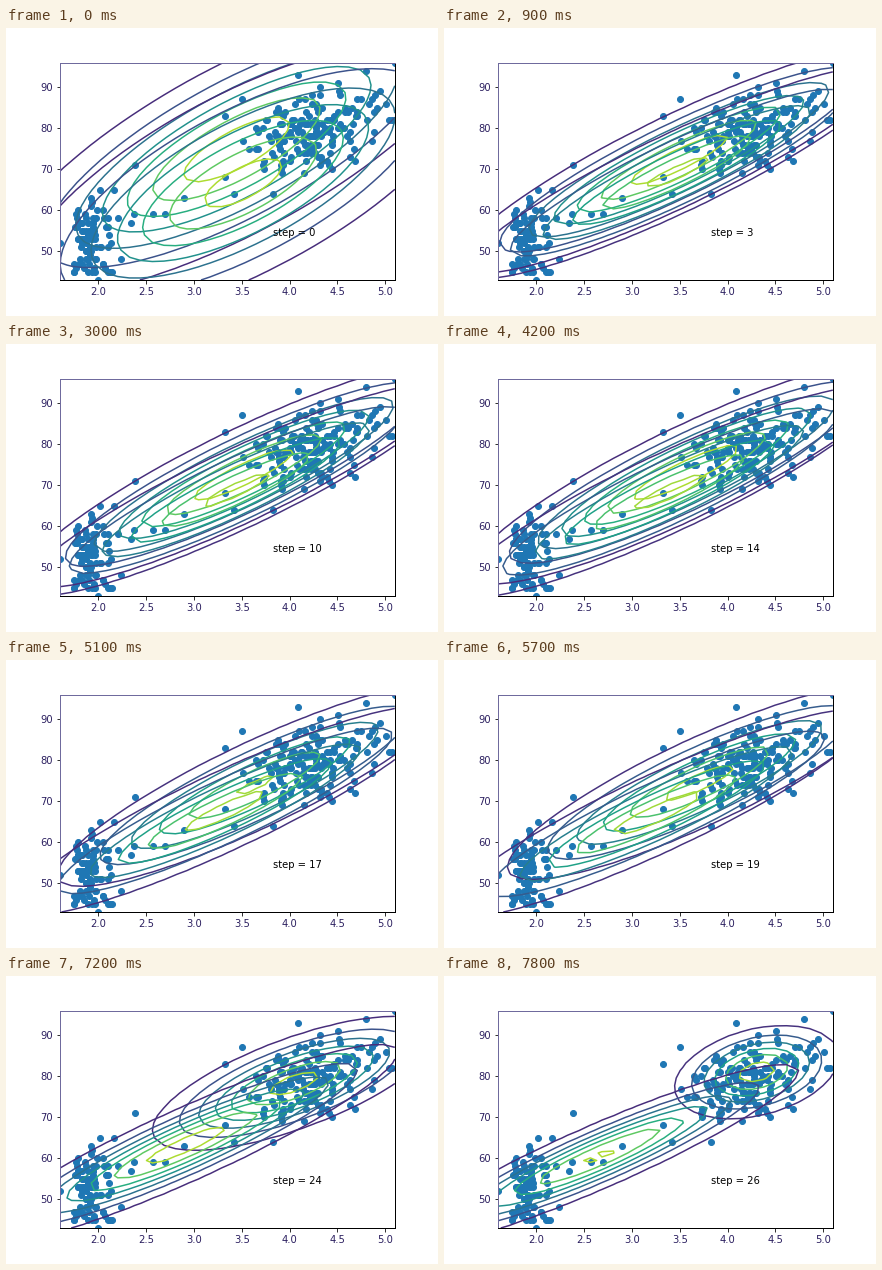
These frames come from a looping animation (432 by 288 pixels, 8 s). A matplotlib script:

```python
import numpy as np
import matplotlib.pyplot as plt
from matplotlib.animation import FuncAnimation

XLIM, YLIM = (1.6, 5.1), (43, 96)
CENTER_X, CENTER_Y = 3.48, 70.75
LAST_STEP = 26
INDIGO = "#2c2060"

# A few lone observations outside the two dense groups
LONERS = [(1.6, 52), (5.1, 96), (3.83, 64), (3.32, 83), (3.5, 87), (2.38, 71),
          (2.9, 63), (3.33, 68), (3.42, 64), (4.8, 94), (4.09, 93), (2, 43)]


def make_data():
    rng = np.random.default_rng(7)
    short_x = 1.73 + rng.gamma(1.7, 0.16, 92)
    short_y = 54 + 8 * (short_x - 2) + 5.3 * rng.normal(size=92)
    z = rng.normal(size=(300, 2))
    z = z[np.hypot(*z.T) < 2.1][:168]
    long_x = 4.3 + 0.38 * z[:, 0]
    long_y = 79.8 + 5.6 * (0.3 * z[:, 0] + 0.95 * z[:, 1])
    x = np.concatenate([short_x, long_x]).clip(1.67, 5.07)
    y = np.concatenate([short_y, long_y]).clip(45, 92)
    return np.vstack([np.column_stack([x, y.round()]), LONERS])


def components(step):
    """Mean, sd of x, slope and residual sd of both Gaussians.

    They start broad, collapse onto the overall trend at once, then drift
    apart exponentially along it.
    """
    start = 0.05 ** step
    split = np.exp(0.186 * (step - LAST_STEP))
    half_x = 0.825 * split - 0.04 * start
    half_y = 1.45 + 8.8 * split + 2.6 * start
    upper = (CENTER_X + half_x, CENTER_Y + half_y,
             1.14 - 0.7 * split ** 1.5 + 0.08 * start,
             10.8 - 6.45 * split ** 2 + 0.25 * start,
             6 - 0.5 * split ** 2 + 5.2 * start)
    lower = (CENTER_X - half_x, CENTER_Y - half_y,
             1.15 - 0.1 * split ** 2 + 0.03 * start,
             10.7 - 0.75 * split - 0.33 * start,
             5.5 - 1.3 * split ** 1.5 + 6.6 * start)
    return upper, lower


def density(mx, my, sx, slope, res):
    u = (X - mx) / sx
    v = (Y - my - slope * (X - mx)) / res
    return np.exp(-(u * u + v * v) / 2) / (2 * np.pi * sx * res)


X, Y = np.meshgrid(np.linspace(*XLIM, 30), np.linspace(*YLIM, 30))

fig = plt.figure(figsize=(6, 4), dpi=72, facecolor="white")
ax = fig.add_axes([0.125, 0.125, 0.775, 0.755])
ax.scatter(*make_data().T, color="#1f77b4")
ax.tick_params(labelcolor=INDIGO)
ax.spines[:].set_linewidth(1)
ax.spines[["left", "top"]].set_color("#6f6a9d")
label = fig.text(267 / 432, 80 / 288, "", fontsize=10)
contours = []


def update(frame):
    step = min(frame // 3, LAST_STEP)
    while contours:
        contours.pop().remove()
    for component in components(step):
        contours.append(ax.contour(X, Y, density(*component), linewidths=1.5))
    ax.set(xlim=XLIM, ylim=YLIM)
    label.set_text(f"step = {step}")


anim = FuncAnimation(fig, update, frames=80, interval=100, repeat=True,
                     repeat_delay=0, blit=False)
plt.show()
```
